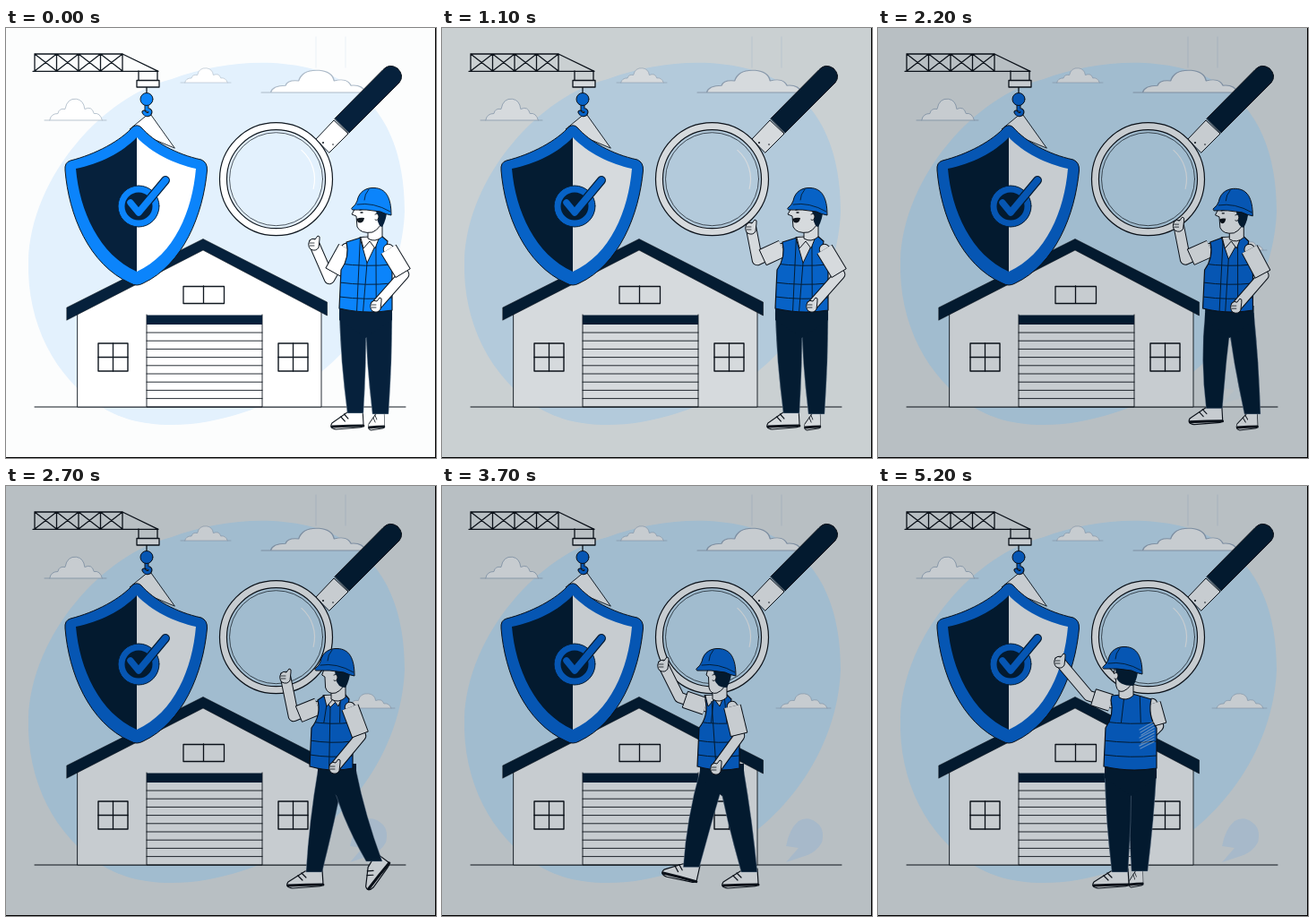
An HTML page with a canvas for the animation above (5300 ms loop, 480x480 px).

```html
<!DOCTYPE html>
<html lang="en">
<head>
<meta charset="utf-8">
<title>Site inspection</title>
<style>
html, body { margin: 0; height: 100%; overflow: hidden; }
canvas { display: block; width: 480px; height: 480px; }
</style>
</head>
<body>
<canvas id="stage" width="480" height="480"></canvas>
<script>
const ctx = document.getElementById('stage').getContext('2d');
const LOOP = 5300, STEP = 100;

// Each colour fades from its daylight tone to its dimmed tone.
const TONES = {
  bg: [[252, 253, 253], [184, 191, 195]],
  pale: [[227, 241, 253], [161, 188, 207]],
  white: [[255, 255, 255], [199, 204, 208]],
  blue: [[11, 132, 251], [6, 86, 179]],
  navy: [[6, 33, 60], [3, 26, 47]],
  ink: [[16, 24, 32], [10, 16, 24]],
  cloud: [[172, 186, 200], [126, 143, 162]],
  haze: [[240, 245, 249], [172, 183, 192]],
  ghost: [[208, 226, 242], [160, 183, 205]]
};
const color = {};
const mix = (a, b, k) => a + (b - a) * k;

function setTones(k) {
  for (const name in TONES) {
    const [day, dim] = TONES[name];
    color[name] = `rgb(${day.map((v, i) => Math.round(mix(v, dim[i], k)))})`;
  }
}

function shape(d, fill, stroke, width = 1) {
  const path = typeof d === 'string' ? new Path2D(d) : d;
  if (fill) { ctx.fillStyle = color[fill]; ctx.fill(path); }
  if (stroke) { ctx.strokeStyle = color[stroke]; ctx.lineWidth = width; ctx.stroke(path); }
}

function disc(x, y, r, fill, stroke, width) {
  const path = new Path2D();
  path.arc(x, y, r, 0, 7);
  shape(path, fill, stroke, width);
}

function box(x, y, w, h, fill, stroke, width) {
  const path = new Path2D();
  path.rect(x, y, w, h);
  shape(path, fill, stroke, width);
}

// ---------- scenery ----------

function cloud(x, y, w, h) {
  const puffs = 'M5 0 Q6 -6 13 -6 Q14 -11 20 -10 Q22 -20 31 -19 Q38 -18 39 -10 Q46 -13 48 -6 Q54 -7 56 0';
  ctx.save();
  ctx.translate(x, y);
  ctx.scale(w / 60, h / 20);
  shape(puffs, 'white');
  shape('M0 0 H60' + puffs, null, 'cloud', 0.7);
  ctx.restore();
}

function crane() {
  let d = 'M30 48.300 H170 L130 29 H32 V48';
  for (let i = 0; i < 4; i++) {
    const x = 32 + i * 24.5;
    d += `M${x} 29 l24.5 19 M${x} 48 l24.5 -19 M${x + 24.5} 29 v19`;
  }
  shape(d, null, 'ink', 1.3);
  shape('M148 48 V59 M169 48 V59 M157 66 V73', null, 'ink', 1.3);
  box(146, 58.5, 25, 7.5, 'white', 'ink', 1.3);
  shape('M160 95 L138 113 L188 134 Z', 'white', 'ink', 0.9);
  shape('M157 86 V91 Q163 92 160 96 Q156 98 154 94', null, 'ink', 5);
  shape('M157 86 V91 Q163 92 160 96 Q156 98 154 94', null, 'blue', 3);
  disc(157, 79.5, 7, 'blue', 'ink');
}

function shield() {
  shape('M142 110 C128 126 100 141 72 148 Q65 150 66 159 C70 208 92 264 139 285 Q146 289 153 285 C198 264 220 208 224.500 159 Q225 150 218 147 C190 141 165 127 151 111 Q147 107 142 110 Z', 'blue', 'ink');
  shape('M146 122 C130 139 104 152 78 157 C82 204 104 253 146 272 Z', 'navy');
  shape('M146 122 C162 139 188 152 212 157 C208 204 188 253 146 272 Z', 'white');
  disc(148, 199, 23, 'blue', 'navy');
  disc(148, 199, 15.5, 'navy');
  const tick = 'M139 195 L148 206 L178 170';
  shape(tick, null, 'navy', 10);
  shape(tick, null, 'blue', 7.5);
}

function magnifier() {
  const x = 301.5, y = 168.7;
  shape('M346 124 L366 103 L382 118 L361 139 Z', 'white', 'ink');
  const ring = new Path2D();
  ring.arc(x, y, 59, 0, 7);
  shape(ring, null, 'white', 8);
  disc(x, y, 63, null, 'ink', 1.2);
  disc(x, y, 55, null, 'ink', 1.2);
  disc(x, y, 52, null, 'ink', 0.7);
  const glare = new Path2D();
  glare.arc(x, y, 43, -0.85, 0.25);
  shape(glare, null, 'white', 1.2);
  disc(354, 128, 1, 'ink');
  disc(365, 130, 0.8, 'ink');
  shape('M367 101 L421 46.500 Q428 39 437 45 Q445 53 439 61 L383 117 Z', 'navy', 'ink');
}

function paneWindow(x) {
  box(x, 352, 33, 31, 'white', 'ink', 1.4);
  shape(`M${x + 16.5} 352 v31 M${x} 367.500 h33`, null, 'ink', 1.3);
}

function house() {
  shape('M80 316 L220 244 L352 314 V423 H80 Z', 'white', 'ink', 0.9);
  shape('M68 312 L220 235.500 L358.500 306 V321 L220 248 L68 326 Z', 'navy', 'ink', 0.6);
  box(198, 288.5, 45.5, 19, 'white', 'ink', 1.3);
  shape('M220.500 288 v19', null, 'ink', 1.3);
  let slats = 'M157 320 V423 H286 V320';
  for (let y = 340; y < 418; y += 9.2) slats += `M157 ${y} h129`;
  shape(slats, null, 'ink', 0.9);
  box(157, 320.5, 129, 10.5, 'navy');
  paneWindow(103);
  paneWindow(304);
}

function scenery(t) {
  box(0, 0, 480, 480, 'bg');
  shape('M25 260 C28 165 110 75 185 57 C250 33 330 31 380 62 C425 90 445 140 445 205 C442 280 400 350 340 393 C290 425 235 443 185 443 C150 443 125 435 105 422 C55 390 23 330 25 260 Z', 'pale');
  shape('M346 10 V44 M379 10 V44', null, 'haze', 1.5);
  cloud(43, 103, 69, 25);
  cloud(195, 61, 56, 17);
  cloud(285, 72, 125, 26);
  cloud(373, 248, 61, 17);
  ctx.globalAlpha = Math.min(1, Math.max(0, (t - 2000) / 700)) * 0.7;
  shape('M398 374 Q408 368 417 375 Q428 382 424 398 Q418 408 408 412 L384 420 L398 404 L384 402 Q388 382 398 374 Z', 'ghost');
  ctx.globalAlpha = 1;
  shape('M32 423 H446', null, 'ink');
  house();
  crane();
  shield();
  magnifier();
}

// ---------- inspector ----------

// keys: [time, x, y] or [time, value]
function track(...keys) {
  return t => {
    let i = 0;
    while (i < keys.length - 1 && keys[i + 1][0] <= t) i++;
    const a = keys[i], b = keys[i + 1] || a;
    const k = b === a ? 0 : Math.max(0, (t - a[0]) / (b[0] - a[0]));
    const out = a.slice(1).map((v, n) => mix(v, b[n + 1], k));
    return out.length > 1 ? out : out[0];
  };
}

// Values while standing, twice during the walk, and on arrival.
const walk = (...poses) => track(...[2000, 2700, 3700, 4300].map((t, i) => [t].concat(poses[i])));

const pose = {
  head: walk([408, 197], [367, 200], [306, 200], [273, 198]),
  face: walk(20, 13, 10, 9),
  hair: walk(5, 0, -3, -8),
  hand: track([0, 344, 241], [500, 345, 223], [2000, 345, 223], [2700, 312, 213], [3700, 247, 200], [4300, 203, 196]),
  elbow: track([0, 361, 280], [500, 352, 259], [2000, 352, 259], [2700, 321, 257], [3700, 265, 236], [4300, 235, 234]),
  shoulder: walk([380, 246], [348, 246], [294, 246], [260, 242]),
  nearShoulder: walk([427, 247], [384, 247], [324, 246], [306, 243]),
  nearElbow: walk([444, 275], [396, 279], [332, 279], [313, 268]),
  nearHand: walk([413, 310], [367, 314], [306, 315], [306, 275]),
  waistL: walk(372, 339, 285, 252),
  waistR: walk(431, 387, 332, 311),
  hipA: walk(387, 363, 322, 296),
  hipB: walk(416, 376, 303, 268),
  ankleA: track([2000, 390, 430], [2300, 368, 422], [2600, 344, 431], [3700, 343, 431], [4000, 318, 422], [4300, 292, 430]),
  ankleB: track([2000, 418, 431], [2500, 418, 431], [2700, 411, 419], [3200, 342, 415], [3650, 279, 425], [4300, 270, 431]),
  toeA: track([2000, 0.9], [2600, 1], [3700, 1], [4300, 0.4]),
  toeB: track([2000, 0.45], [2700, 0.95], [4300, 1]),
  tiltB: track([2500, 0], [2700, -0.87], [3200, -0.3], [3700, 0.28], [3900, 0])
};

function limb(points, width) {
  const d = 'M' + points.map(p => p.join(' ')).join('L');
  shape(d, null, 'ink', width + 2);
  shape(d, null, 'white', width);
}

function arm(shoulder, elbow, hand, sleeve) {
  limb([shoulder, elbow, hand], 10.5);
  const cuff = [0, 1].map(i => mix(shoulder[i], elbow[i], sleeve));
  ctx.lineCap = 'butt';
  limb([shoulder, cuff], 18);
  const dx = elbow[0] - shoulder[0], dy = elbow[1] - shoulder[1];
  const n = 9.5 / Math.hypot(dx, dy);
  shape(`M${cuff[0] - dy * n} ${cuff[1] + dx * n} L${cuff[0] + dy * n} ${cuff[1] - dx * n}`, null, 'ink');
  ctx.lineCap = 'round';
}

function fist([x, y]) {
  ctx.save();
  ctx.translate(x, y);
  shape('M-5 -4 Q-2 -7 1 -5 L4 -9 Q7 -9 6 -5 L5 4 Q2 9 -4 6 Q-8 2 -5 -4 Z', 'white', 'ink');
  shape('M-5 -1 H0 M-5 2 H0', null, 'ink', 0.8);
  ctx.restore();
}

function leg(hip, [ax, ay], toe, tilt) {
  ctx.save();
  ctx.translate(ax, ay);
  ctx.rotate(tilt);
  ctx.scale(toe, 1);
  shape('M9 -4 L10 12 Q10 16 4 16 L-24 18 Q-33 17 -29 11 L-10 -1 Z', 'white', 'ink', 1.2);
  shape('M10 14 Q-8 14 -29 15', null, 'ink', 3);
  shape('M-18 4 l5 5 M-14 1 l5 5', null, 'ink', 1.2);
  ctx.restore();
  const kx = (hip + ax) / 2 - Math.max(0, 430 - ay) * 0.6, ky = (316 + ay) / 2;
  shape(`M${hip - 15} 318 Q${kx - 15} ${ky} ${ax - 9} ${ay} L${ax + 9} ${ay} Q${kx + 14} ${ky} ${hip + 15} 318 Z`, 'navy', 'cloud', 0.4);
}

function vest(p) {
  const [hx] = p.head, [lx] = p.shoulder, [rx] = p.nearShoulder, l = p.waistL, r = p.waistR;
  const outline = new Path2D(`M${hx - 12} 234 L${lx} 239 Q${lx + 4} 256 ${l + 2} 270 L${l} 313 Q${(l + r) / 2} 320 ${r} 315 L${r} 270 Q${rx - 5} 257 ${rx - 1} 238 L${hx + 11} 232 Z`);
  shape(outline, 'blue', 'ink', 1.2);
  ctx.save();
  ctx.clip(outline);
  let seams = '';
  for (const y of [264, 285, 301]) seams += `M${l} ${y - 1} Q${(l + r) / 2} ${y + 3} ${r} ${y}`;
  for (const k of [0.33, 0.7]) seams += `M${mix(lx, rx, k)} 232 L${mix(l, r, k)} ${p.face > 14 ? 318 : 264}`;
  shape(seams, null, 'navy', 1);
  ctx.restore();
  const depth = (p.face - 8) * 2.2;
  if (depth > 3) {
    shape(`M${hx - 13} 234 L${hx - 5} ${236 + depth} L${hx + 9} 233 Z`, 'white', 'ink');
    shape(`M${hx - 12} 234 l3 12 l7 -8 l6 8 l5 -13`, 'white', 'ink');
    shape(`M${hx - 5} ${236 + depth} L${mix(l, r, 0.45)} 317`, null, 'navy');
  }
}

function head(p) {
  const [x, y] = p.head, f = p.face;
  ctx.save();
  ctx.translate(x, y);
  shape('M-4 20 V38 Q4 43 12 36 V14 Z', 'white', 'ink');
  shape(`M${-f * 0.85} 2 L${-f * 1.1} 11 L${-f * 0.85} 13 L${-f * 0.8} 25 Q${-f * 0.6} 33 1 31 Q11 27 15 10 V0 Z`, 'white', 'ink');
  shape(`M${p.hair} 5 L${p.hair + 1} 15 Q${p.hair + 3} 25 12 25 Q17 16 17 7 Z`, 'navy');
  if (f > 14) {
    shape(`M${-f * 0.85} 16 Q-12 14 -8 15 Q-9 22 ${-f * 0.75} 20 Z`, 'ink');
    shape('M-13 6 l4 -1 M-12 9 h2', null, 'ink', 1.4);
  }
  shape(`M${p.hair - 1} 11 q4 -2 4 3 q-1 5 -4 3`, 'white', 'ink', 0.9);
  shape('M-22 4 Q-17 0 -16 -4 C-14 -15 -5 -19 3 -18.500 C16 -18 22 -8 22 12 Q16 11 10 8 Q-6 5 -21 6 Z', 'blue', 'ink');
  shape('M-16 0 Q2 -3 21 8 M-3 -17 Q-8 -11 -8 -5', null, 'navy', 0.9);
  ctx.restore();
}

function inspector(t) {
  const p = {};
  for (const name in pose) p[name] = pose[name](t);
  const turned = t >= 4100;
  const nearArm = () => {
    arm(p.nearShoulder, p.nearElbow, p.nearHand, 0.95);
    if (!turned) fist(p.nearHand);
  };
  leg(p.hipA, p.ankleA, p.toeA, 0);
  leg(p.hipB, p.ankleB, p.toeB, p.tiltB);
  const left = Math.min(p.hipA, p.hipB) - 15, right = Math.max(p.hipA, p.hipB) + 15;
  shape(`M${left} 310 H${right} V326 L${(left + right) / 2} 346 L${left} 326 Z`, 'navy');
  arm(p.shoulder, p.elbow, p.hand, 0.78);
  fist(p.hand);
  if (turned) nearArm();
  vest(p);
  head(p);
  if (!turned) nearArm();
  if (t >= 4300) {
    ctx.globalAlpha = 0.45;
    for (let i = 0; i < 8; i++) shape(`M${292 + i % 3} ${272 + i * 3} L308 ${263 + i * 3.2}`, null, 'white', 1.4);
    ctx.globalAlpha = 1;
  }
}

function draw(now) {
  const t = Math.floor(now % LOOP / STEP) * STEP;
  setTones(Math.min(1, t / 1500));
  ctx.lineCap = ctx.lineJoin = 'round';
  scenery(t);
  inspector(t);
  ctx.fillStyle = '#000';
  ctx.fillRect(0, 479, 480, 1);
  ctx.fillRect(479, 0, 1, 480);
  requestAnimationFrame(() => draw(performance.now()));
}
draw(0);
</script>
</body>
</html>
```
